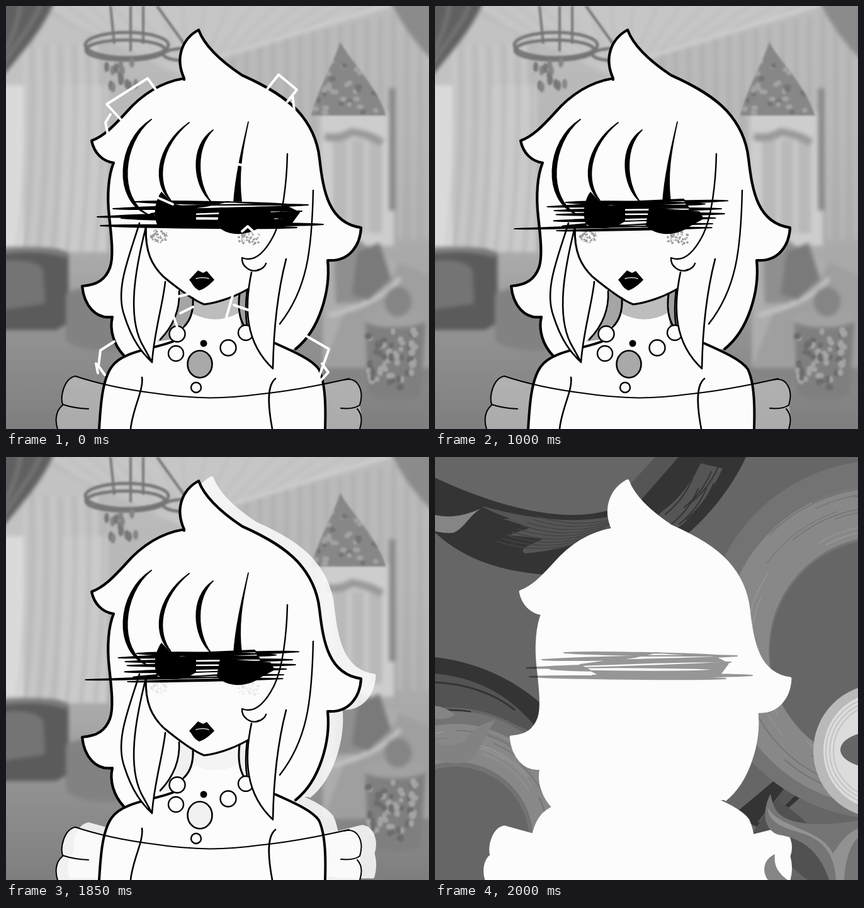
Recreate the animation shown at these times as an HTML page with a canvas. Size 672x672 px, loop 2050 ms.

```html
<!DOCTYPE html>
<html lang="en">
<head>
<meta charset="utf-8">
<title>Portrait loop</title>
<style>
html, body { margin: 0; width: 100%; height: 100%; overflow: hidden; background: #666; }
canvas { display: block; width: 672px; height: 672px; }
</style>
</head>
<body>
<canvas id="stage" width="672" height="672"></canvas>
<script>
const SIZE = 672, LOOP = 2050, INK = '#000', PAPER = '#fcfcfc';
const ctx = document.getElementById('stage').getContext('2d');
const P = d => new Path2D(d);

function layer(draw) {
  const c = document.createElement('canvas');
  c.width = c.height = SIZE;
  draw(c.getContext('2d'));
  return c;
}
function fill(g, d, color) {
  g.fillStyle = color;
  g.fill(typeof d === 'string' ? P(d) : d);
}
function line(g, d, color, width) {
  g.strokeStyle = color;
  g.lineWidth = width;
  g.stroke(typeof d === 'string' ? P(d) : d);
}
function oval(g, x, y, rx, ry, color, edge = 0) {
  g.beginPath();
  g.ellipse(x, y, rx, ry, 0, 0, 7);
  if (color) { g.fillStyle = color; g.fill(); }
  if (edge) { g.strokeStyle = INK; g.lineWidth = edge; g.stroke(); }
}
function random(seed) {
  return () => {
    seed = (seed * 16807) % 2147483647;
    return seed / 2147483647;
  };
}

// ---- Room ----
function drawRoom(g) {
  const r = random(41);
  const wall = g.createLinearGradient(0, 0, 0, SIZE);
  [[0, '#bcbcbc'], [.3, '#b8b8b8'], [.62, '#a8a8a8'], [.76, '#939393'], [1, '#7e7e7e']]
    .forEach(([at, c]) => wall.addColorStop(at, c));
  g.fillStyle = wall;
  g.fillRect(0, 0, SIZE, SIZE);
  fill(g, 'M60 0H610L360 75L290 120L120 40Z', '#c6c6c6');
  for (let i = 0; i < 14; i++) line(g, `M${90 + i * 38} 0L${230 + i * 12} 95`, '#b8b8b8', 2);
  fill(g, 'M0 120L75 20L150 60V385H0Z', '#c2c2c2');
  fill(g, 'M0 130H34V380H0Z', '#dadada');
  fill(g, 'M95 130H165V390H90Z', '#cacaca');
  for (let i = 0; i < 12; i++) {
    const x = 36 + i * 11;
    line(g, `M${x} ${50 + r() * 20}Q${x + 5} 250 ${x - 12} 390`, i % 2 ? '#b6b6b6' : '#cbcbcb', 4);
  }
  for (let i = 0; i < 32; i++) {
    const x = 350 + i * 10.4;
    line(g, `M${x} ${78 - i * 2.4}V370`, i % 2 ? '#aeaeae' : '#bababa', 5);
  }
  line(g, 'M320 92L620 0', '#d0d0d0', 6);
  fill(g, 'M0 0H82C65 42 38 72 0 118Z', '#606060');
  line(g, 'M30 0C25 40 12 65 0 85M62 0C50 36 25 60 0 102', '#777', 6);
  fill(g, 'M605 0H672V92C650 72 625 40 605 0Z', '#8b8b8b');

  // mirror
  fill(g, 'M497 172H610V380H497Z', '#cdcdcd');
  fill(g, 'M516 215H592V360H516Z', '#b9b9b9');
  line(g, 'M541 210V350M568 205V360', '#c8c8c8', 8);
  line(g, 'M503 210Q525 215 545 203Q575 207 592 220', '#999', 12);
  line(g, 'M608 135V325', '#8a8a8a', 10);

  // furniture
  fill(g, 'M0 385C45 380 96 383 104 393V500L85 511H0Z', '#5b5b5b');
  fill(g, 'M0 404C30 400 62 404 65 420L68 470L0 480Z', '#747474');
  line(g, 'M0 390Q65 382 101 396', '#888', 5);
  fill(g, 'M100 455C125 440 180 440 190 460V540C160 548 112 542 100 525Z', '#828282');
  fill(g, 'M500 390C545 380 620 390 672 440V570H500Z', '#adadad');
  fill(g, 'M535 480C595 460 610 430 618 405L672 430V570H500Z', '#9f9f9f');
  line(g, 'M510 488Q590 470 620 430', '#c4c4c4', 7);
  fill(g, 'M518 405L555 370L580 390L560 468L520 470Z', '#8f8f8f');
  fill(g, 'M554 390L588 375L606 432L570 465L545 455Z', '#7a7a7a');
  fill(g, 'M440 570H672V595H440Z', '#858585');
  fill(g, 'M566 490H660L652 613Q612 630 570 610Z', '#7f7f7f');
  oval(g, 612, 493, 50, 14, '#a2a2a2');
  oval(g, 617, 467, 21, 23, '#858585');
}
function drawOrnament(g) {
  const r = random(9);
  line(g, 'M198 0V72M166 0L172 60M218 0V60M240 0L290 70', '#777', 4);
  g.strokeStyle = '#757575';
  [[190, 70, 63, 16], [192, 62, 66, 20], [290, 77, 40, 10]].forEach(([x, y, rx, ry]) => {
    g.lineWidth = 5;
    g.beginPath(); g.ellipse(x, y, rx, ry, 0, 0, 7); g.stroke();
  });
  for (let i = 0; i < 14; i++) oval(g, 160 + r() * 52, 88 + r() * 48, 4, 8, r() < .5 ? '#858585' : '#777');
  const crest = P('M531 57C545 85 588 125 604 174H485C496 130 522 88 531 57Z');
  fill(g, crest, '#878787');
  g.save();
  g.clip(crest);
  for (let i = 0; i < 50; i++) oval(g, 485 + r() * 120, 80 + r() * 92, 3 + r() * 3, 4, r() < .6 ? '#a2a2a2' : '#747474');
  g.restore();
  for (let i = 0; i < 60; i++) {
    oval(g, 574 + r() * 76, 515 + r() * 92, 3 + r() * 3, 4 + r() * 3, r() < .55 ? '#a4a4a4' : '#6c6c6c');
  }
}
const room = layer(g => {
  g.filter = 'blur(3px)';
  g.drawImage(layer(drawRoom), -7, -7, SIZE + 14, SIZE + 14);
  g.filter = 'blur(1.6px)';
  g.drawImage(layer(drawOrnament), 0, 0);
});

// ---- Swirls ----
function hoop(g, x, y, outer, inner, shift, color) {
  g.fillStyle = color;
  g.beginPath();
  g.arc(x, y, outer, 0, 7);
  g.closePath();
  g.moveTo(x + inner, y + shift);
  g.arc(x, y + shift, inner, 0, 7);
  g.fill('evenodd');
}
function streaks(g, x, y, from, to, seed) {
  const r = random(seed);
  for (let i = 0; i < 34; i++) {
    const a = r() * 6.3;
    g.strokeStyle = i % 2 ? '#747474' : '#959595';
    g.lineWidth = 1 + r() * 1.5;
    g.beginPath();
    g.arc(x, y, from + r() * (to - from), a, a + .3 + r() * .5);
    g.stroke();
  }
}
const swirl = layer(g => {
  const r = random(77);
  fill(g, 'M0 0H672V672H0Z', '#666');
  fill(g, 'M178 0C215 80 300 170 400 187C500 192 600 187 672 120V33C560 85 440 115 360 70C330 50 310 20 290 0Z', '#343434');
  fill(g, 'M285 0H322L382 65L355 80Z', '#555');
  fill(g, 'M340 75C410 112 500 104 598 78C570 95 535 100 565 98L520 112L555 124L500 130C520 140 540 145 530 153C480 150 390 130 340 75Z', '#555');
  fill(g, 'M215 18L250 10C270 55 310 90 345 110L290 115C260 95 235 60 215 18Z', '#555');
  for (let i = 0; i < 9; i++) {
    const x = 222 + r() * 60, y = 10 + r() * 40;
    line(g, `M${x} ${y}q14 34 44 58`, '#343434', 2);
    line(g, `M${370 + i * 8} ${92 + i * 5}q65 26 140 2`, '#444', 1.5);
  }
  fill(g, 'M85 535L120 503L200 570L150 592Z', '#343434');
  fill(g, 'M100 538L112 520L160 580L145 582Z', '#555');
  fill(g, 'M18 672C40 620 90 565 130 545L170 600L80 672Z', '#515151');
  hoop(g, -40, 290, 285, 180, 20, '#737373');
  hoop(g, -40, 300, 255, 182, 8, '#888');
  streaks(g, -40, 303, 186, 260, 5);
  fill(g, 'M0 453L40 458L10 467H0Z', '#343434');
  fill(g, 'M672 318C610 325 550 350 500 395V445C540 390 590 355 672 345Z', '#343434');
  fill(g, 'M672 344C590 352 540 390 500 445L545 425C590 400 640 395 672 400Z', '#535353');
  line(g, 'M672 358Q595 362 545 402M672 403Q640 400 615 405', '#343434', 3);
  hoop(g, 640, 590, 186, 118, 20, '#737373');
  hoop(g, 640, 598, 174, 124, 10, '#888');
  streaks(g, 640, 602, 126, 172, 31);
});
function ring(x, y, hole) {
  oval(ctx, x, y, 106, 106, '#b9b9b9');
  oval(ctx, x, y, 90, 92, '#dcdcdc');
  ctx.strokeStyle = '#c2c2c2';
  ctx.lineWidth = 2;
  [74, 80, 86].forEach((rad, i) => {
    ctx.beginPath();
    ctx.arc(x, y, rad, i, i + 4.5);
    ctx.stroke();
  });
  oval(ctx, x, y - 2, 63, hole, '#666');
}
const flamesA = [
  ['M0 75C20 60 40 30 35 0H55C45 30 60 60 95 75C125 85 140 105 138 152C125 125 100 110 75 105C40 108 10 115 0 130Z', '#858585'],
  ['M0 65C25 55 38 35 38 0H44C42 40 60 75 100 85C125 92 136 105 138 122C110 100 65 100 45 75C25 75 10 90 0 100Z', '#999'],
  ['M104 0C130 5 140 25 134 50C150 35 152 10 145 0Z', '#929292'],
  ['M577 293C600 285 605 250 622 235C640 222 655 225 672 240V212C640 203 610 215 603 245C600 270 590 285 577 293Z', '#929292'],
  ['M628 292C640 310 655 320 672 320V292C655 297 640 296 628 292Z', '#929292'],
  ['M590 672C615 642 640 628 672 630V672Z', '#777']
];
const flamesB = [
  ['M0 92C25 98 50 92 73 82C52 95 48 112 30 120C20 122 10 120 0 118Z', '#858585'],
  ['M95 418C70 425 52 440 50 450C30 462 10 458 0 453V480C30 492 58 488 68 468C76 453 84 440 95 418Z', '#828282'],
  ['M0 395Q20 398 32 410Q15 418 0 416Z', '#858585'],
  ['M533 535C518 565 523 592 545 600C585 606 612 628 626 672H672V577C640 584 570 590 546 566C537 556 535 545 533 535Z', '#757575'],
  ['M528 556C530 585 560 590 590 600C620 612 635 635 637 672H650C652 640 660 615 672 605V590C650 600 640 620 632 630C615 590 545 590 528 556Z', '#929292'],
  ['M540 631C520 640 520 660 529 672H560C545 660 538 650 540 631Z', '#858585']
];
const paint = list => list.forEach(([d, color]) => fill(ctx, d, color));
function drawSwirl(flip) {
  ctx.save();
  if (flip) { ctx.translate(SIZE, 0); ctx.scale(-1, 1); }
  ctx.drawImage(swirl, 0, 0);
  ctx.restore();
}

// ---- Figure ----
// hair outline runs from the lower right over the tip to the lower left
const hair = P('M460 545C498 515 516 452 511 404C547 407 563 378 564 352C513 345 504 295 498 242C495 215 485 190 463 166C445 147 420 130 375 110C345 90 316 65 306 38'
  + 'C280 52 268 82 283 115C246 121 216 140 190 170C170 192 155 207 136 214C140 234 154 247 171 249C163 268 160 300 164 335C168 370 171 400 165 416C158 434 146 443 121 445C124 475 142 498 169 494C164 514 171 538 187 555');
const leftArm = 'M265 533C235 545 185 548 168 573C152 595 150 640 148 672';
const body = P(leftArm + 'H507C508 640 508 600 497 577C487 562 455 548 428 536Z');
const bodyLine = P(leftArm + 'M428 536C455 548 487 562 497 577C508 600 508 640 507 672');
const puffs = P('M110 588C92 592 86 620 90 633C78 642 78 660 82 672H150L157 601ZM545 592C563 595 568 618 562 634C566 650 565 660 562 672H505V602Z');

function silhouette(dx, dy, alpha) {
  const c = layer(g => {
    g.translate(dx, dy);
    g.lineJoin = 'round';
    [hair, body, puffs].forEach(p => fill(g, p, PAPER));
    [hair, bodyLine, puffs].forEach(p => line(g, p, PAPER, 5));
  });
  return () => {
    ctx.globalAlpha = alpha;
    ctx.drawImage(c, 0, 0);
    ctx.globalAlpha = 1;
  };
}
const white = silhouette(0, 0, 1), nearGhost = silhouette(21, -5, .86), farGhost = silhouette(50, -17, .34);

function blush() {
  const r = random(23);
  [[243, 366, 14], [387, 369, 18]].forEach(([x, y, w]) => {
    for (let i = 0; i < 55; i++) {
      const a = r() * 6.3, d = Math.sqrt(r()), s = .6 + r() * 1.4;
      oval(ctx, x + Math.cos(a) * d * w, y + Math.sin(a) * d * 11, s, s, '#9c9c9c');
    }
  });
}

// shade: strength of the grey tones, 1 = full
function figure(shade) {
  ctx.globalAlpha = 1 - .65 * shade;
  fill(ctx, puffs, PAPER);
  ctx.globalAlpha = 1;
  line(ctx, 'M110 588C92 592 86 620 90 633Q108 639 131 640M90 634C78 644 78 660 82 672M537 594C560 588 569 612 562 634Q552 641 532 639M558 640C567 650 565 663 562 672', INK, 2);
  fill(ctx, body, PAPER);
  fill(ctx, hair, PAPER);
  ctx.globalAlpha = shade;
  fill(ctx, 'M275 453L297 464C298 485 293 502 280 508L262 530L240 533C262 512 277 485 275 453Z', '#a5a5a5');
  fill(ctx, 'M371 457L384 450Q380 485 385 510L373 509Z', '#a0a0a0');
  fill(ctx, 'M298 465L316 474L371 457L369 488Q334 507 297 489Z', '#bdbdbd');
  blush();
  ctx.globalAlpha = 1;
  line(ctx, hair, INK, 4.2);
  line(ctx, bodyLine, INK, 4);
  line(ctx, 'M110 588C140 598 180 608 235 615C300 625 350 624 400 617C450 612 510 600 545 592', INK, 2);
  line(ctx, 'M216 590C219 610 201 640 198 672M428 592C413 604 417 640 423 672', INK, 2.6);
  // face and neck
  line(ctx, 'M222 350C221 392 232 412 250 430C272 448 298 468 315 474C340 471 368 460 389 447C394 436 389 422 402 419', INK, 3);
  line(ctx, 'M297 464C298 485 293 500 282 510M371 457C368 482 372 498 378 508', INK, 3);
  line(ctx, 'M275 453C277 488 262 512 245 530M383 451Q379 485 383 508', INK, 2.6);
  // beads
  [[272, 521, 12.5], [270, 552, 12], [353, 543, 12.5], [381, 519, 12], [302, 606, 8]]
    .forEach(([x, y, s]) => oval(ctx, x, y, s, s, PAPER, 2.4));
  oval(ctx, 314, 536, 5.5, 5.5, INK);
  oval(ctx, 308, 569, 19.5, 21.5, PAPER);
  ctx.globalAlpha = shade;
  oval(ctx, 308, 569, 19.5, 21.5, '#a9a9a9');
  ctx.globalAlpha = 1;
  oval(ctx, 308, 569, 19.5, 21.5, null, 2.6);
  // locks
  const lockL = 'M212 345C195 400 173 450 188 492C200 530 215 550 232 566C235 520 250 470 253 438';
  const lockR = 'M390 423C378 480 380 535 424 576C425 520 430 460 445 402';
  fill(ctx, lockL, PAPER);
  fill(ctx, lockR, PAPER);
  line(ctx, 'M222 350C221 392 232 412 250 430', INK, 3);
  line(ctx, lockL + 'M222 352C205 420 193 490 215 535L232 566', INK, 2.6);
  line(ctx, lockR, INK, 2.6);
  line(ctx, 'M447 235C446 280 440 335 425 365C412 390 395 408 375 400C374 414 388 423 400 420C407 418 412 413 413 409M488 293C486 390 478 450 435 505', INK, 2.4);
  // bangs
  const bangs = P('M231 180C175 215 170 310 225 331C178 306 184 218 231 180M291 185C235 225 233 285 262 309C239 280 243 225 291 185M329 197C291 222 297 285 325 310C303 280 301 225 329 197M385 184C373 235 365 270 362 310H374C369 270 374 235 385 184');
  fill(ctx, bangs, INK);
  line(ctx, bangs, INK, 1.7);
  oval(ctx, 283, 117, 2, 2, INK);
  // eyes and lips
  fill(ctx, 'M247 295C238 306 233 330 240 347C260 356 284 355 302 342V322L265 314Z', INK);
  fill(ctx, 'M335 348C350 367 385 366 405 350L427 338L420 326L340 320Z', INK);
  fill(ctx, 'M291 435L305 420L313 424L319 421L331 435C322 445 313 450 307 452C297 447 296 440 291 435Z', INK);
  line(ctx, 'M302 433Q313 430 322 433', '#ddd', 1.6);
}

// ---- Scribbles: x1, y1, x2, y2, half width ----
const scribbleA = {
  core: 'M230 330L318 318L350 311L442 316L466 328L452 347L350 344L258 345Z',
  lines: [[205, 311, 447, 315, 3], [170, 322, 480, 316, 3.5], [145, 335, 470, 326, 3], [183, 337, 455, 338, 4], [150, 349, 462, 352, 3], [250, 347, 504, 347, 3]]
};
const scribbleB = {
  core: 'M238 314L395 307L412 336L345 350L240 350Z',
  lines: [[176, 318, 464, 309, 3], [208, 312, 430, 314, 4], [190, 331, 462, 331, 3], [187, 326, 455, 322, 3], [187, 341, 445, 338, 3], [127, 354, 440, 346, 2], [192, 356, 442, 352, 2], [200, 350, 400, 341, 4]]
};
function scribble(s, step) {
  const r = random(900 + step * 37);
  const j = n => step ? (r() - .5) * n : 0;
  r();
  const all = P(s.core);
  s.lines.forEach(([x1, y1, x2, y2, w]) => {
    const a = x1 + j(5), b = y1 + j(2), c = x2 + j(6), d = y2 + j(2.5);
    const p = a + (c - a) * .15, q = a + (c - a) * .85;
    all.addPath(P(`M${a} ${b}C${p} ${b + w} ${q} ${d + w} ${c} ${d}C${q} ${d - w} ${p} ${b - w} ${a} ${b}Z`));
  });
  return layer(g => {
    g.lineJoin = 'round';
    fill(g, all, INK);
    line(g, all, INK, 1.8);
  });
}
const opening = scribble(scribbleA, 0);
const jitters = [1, 2, 3, 4].map(n => scribble(scribbleB, n));

// ---- White outlines flying off ----
const glint = P('M182 180L160 156L225 115L238 133M162 205L158 185L166 172M415 132L433 109L462 133L447 152M455 142L458 165M172 533L150 547L147 572L157 586M143 568L146 583M475 523L513 545L497 590M502 568L512 582L500 595M265 490L272 510M272 462L300 455M277 488L297 478M350 495L360 460M362 475L385 483M362 250L376 253M240 304L265 315M375 358L384 350L400 365');
function glints(step) {
  const k = 1 + step * .045;
  ctx.save();
  ctx.translate(330, 340);
  ctx.scale(k, k);
  ctx.translate(-330, -340);
  line(ctx, glint, '#fff', 4 - step * .9);
  ctx.restore();
}

function render(t) {
  ctx.lineCap = ctx.lineJoin = 'round';
  if (t >= 1950) {
    const last = t >= 2000;
    drawSwirl(true);
    ring(707, last ? 467 : 350, 30);
    if (!last) farGhost();
    white();
    paint(flamesB);
    ctx.globalAlpha = last ? .4 : .15;
    ctx.drawImage(opening, 0, 0);
    ctx.globalAlpha = 1;
  } else if (t >= 1900) {
    drawSwirl(false);
    ring(-35, 237, 47);
    paint(flamesA);
    farGhost();
    nearGhost();
    line(ctx, 'M171 195V175Q171 163 183 163H205M145 600V575H168', '#fff', 4);
    white();
  } else {
    ctx.drawImage(room, 0, 0);
    if (t >= 1850) nearGhost();
    figure(t < 1800 ? 1 : t < 1850 ? .55 : .14);
    ctx.drawImage(t < 200 ? opening : jitters[Math.floor(t / 100) % 4], 0, 0);
    if (t < 200) glints(Math.floor(t / 50));
  }
}

function tick() {
  render(performance.now() % LOOP);
  requestAnimationFrame(tick);
}
tick();
</script>
</body>
</html>
```
